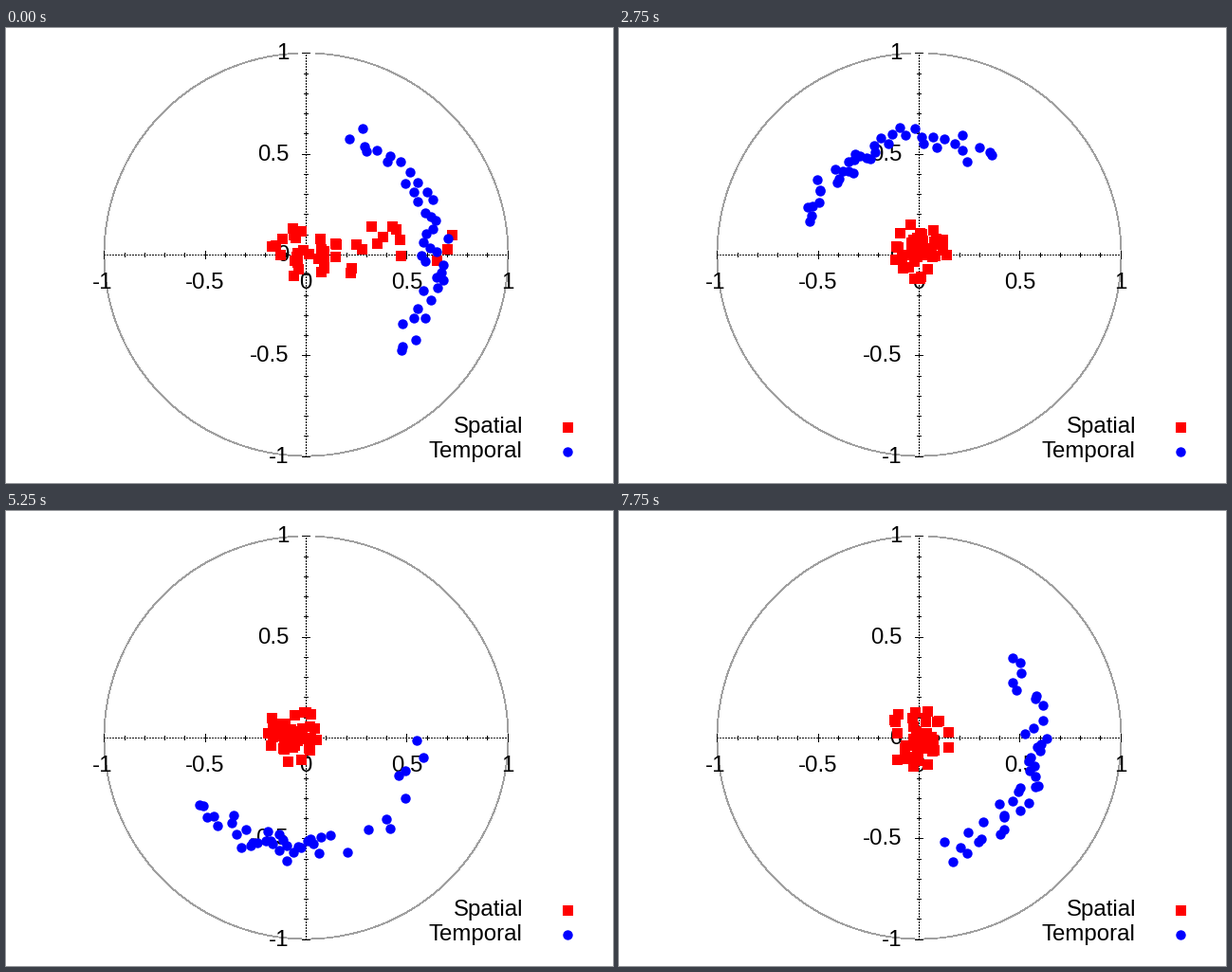
Recreate the animation shown at these times as a matplotlib script. Size 640 by 480 pixels, loop 8000 ms.

```python
import numpy as np
import matplotlib.pyplot as plt
from matplotlib.animation import FuncAnimation

W, H, DPI = 640, 480, 100
PX = 72 / DPI
CX, CY, R = 316, 238, 212.7
FRAMES, INTERVAL = 32, 250
COUNT = 40
FONT = dict(family="Liberation Sans", size=24 * PX, color="black",
            va="baseline", zorder=2)

# Mean phase of the ring in degrees: it swings back once, then turns onward.
TURN_AT = [0, 5, 9, 10, 14, 20, 21, 26, 30, 31]
TURN = [5, -135, 42, 86, 190, 222, 262, 490, 630, 705]

# Key poses: frame, quartiles of the ring's angles about the mean phase,
# ring radius, cloud centre, cloud radius, length of the cloud's tail.
POSES = [
    (0, (64, 28, 3, -17, -51), 0.64, -0.06, 0.14, 0.8),
    (5, (77, 53, -3, -19, -56), 0.59, 0.01, 0.15, 0),
    (9, (48, 23, 7, -22, -56), 0.57, 0.03, 0.14, 0),
    (14, (57, 23, 0, -33, -64), 0.58, 0, 0.15, 0),
    (21, (96, 17, -3, -20, -50), 0.57, -0.07 + 0.01j, 0.14, 0),
    (26, (92, 38, 2, -70, -87), 0.56, 0.02 - 0.03j, 0.15, 0),
    (31, (55, 17, -5, -30, -62), 0.58, -0.01j, 0.16, 0),
]

rng = np.random.default_rng(11)
RANK = (np.arange(COUNT) + rng.uniform(-0.45, 0.45, COUNT)) / (COUNT - 1)
DISC = np.sqrt(rng.random(COUNT)) * np.exp(2j * np.pi * rng.random(COUNT))
TAIL = rng.permutation(np.linspace(0, 1, COUNT)) ** 3


def phase(i):
    return np.radians(np.interp(i, TURN_AT, TURN))


def build(frame, quartiles, radius, centre, spread, tail):
    """Ring radii, ring angles and cloud points in the turning frame."""
    ang = np.radians(np.interp(RANK, np.linspace(0, 1, 5), quartiles))
    rad = radius + rng.uniform(-0.07, 0.07, COUNT)
    red = centre * np.exp(-1j * phase(frame)) + spread * DISC + tail * TAIL
    return rad, ang, red


times = [p[0] for p in POSES]
shapes = [build(*p) for p in POSES]

# One unit is one pixel, measured from the top left corner.
fig = plt.figure(figsize=(W / DPI, H / DPI), dpi=DPI, facecolor="white")
ax = fig.add_axes([0, 0, 1, 1])
ax.set_xlim(0, W)
ax.set_ylim(H, 0)
ax.axis("off")


def line(x, y, color="black", width=1, **kw):
    ax.plot(x, y, color=color, lw=width * PX, antialiased=False, zorder=1, **kw)


def draw_axes():
    base = CY + 1  # lines snap one row up
    # The circle is open around the top tick.
    a = np.radians(np.linspace(92.5, 447.3, 500))
    line(CX + 0.5 + 213 * np.cos(a), base - 212.5 * np.sin(a), "#a0a0a0", 0.8)
    dots = dict(linestyle=(0, (2, 2)), dash_capstyle="butt")
    line([103, 529], [base, base], **dots)
    line([CX, CX], [452, 27], **dots)
    for k in range(-10, 11):
        size = 4 if k % 5 == 0 else 2
        x, y = round(CX + k * R / 10), round(base - k * R / 10)
        line([x, x], [base - size, base + size])
        line([CX - size, CX + size], [y, y])
    for v in (-1, -0.5, 0, 0.5, 1):
        label = f"{v:g}"
        shift = -2 if v == -1 else 0
        ax.text(CX + v * R + shift, 275, label, ha="center", **FONT)
        ax.text(298.7, 246 - v * R, label, ha="right", **FONT)


def markers(shape, color, size, z):
    return ax.plot([], [], shape, color=color, ms=size * PX, mew=0,
                   antialiased=False, zorder=z)[0]


def legend(name, right, y, shape, color, size):
    ax.text(right, y + 6.5, name, ha="right", **FONT)
    markers(shape, color, size, 3).set_data([592], [y])
    return markers(shape, color, size, 4 if shape == "o" else 3)


draw_axes()
spatial = legend("Spatial", 545, 421, "s", "red", 11)
temporal = legend("Temporal", 544, 447, "o", "blue", 10.4)


def place(dots, z):
    dots.set_data(np.round(CX + R * z.real), np.round(CY - R * z.imag))


def update(i):
    n = min(np.searchsorted(times, i, side="right"), len(times) - 1)
    w = (i - times[n - 1]) / (times[n] - times[n - 1])
    rad, ang, red = [p + (q - p) * w for p, q in zip(shapes[n - 1], shapes[n])]
    spin = np.exp(1j * phase(i))
    place(temporal, rad * np.exp(1j * ang) * spin)
    place(spatial, red * spin)
    return spatial, temporal


anim = FuncAnimation(fig, update, frames=FRAMES, interval=INTERVAL,
                     repeat=True, repeat_delay=0, blit=False)
plt.show()
```
